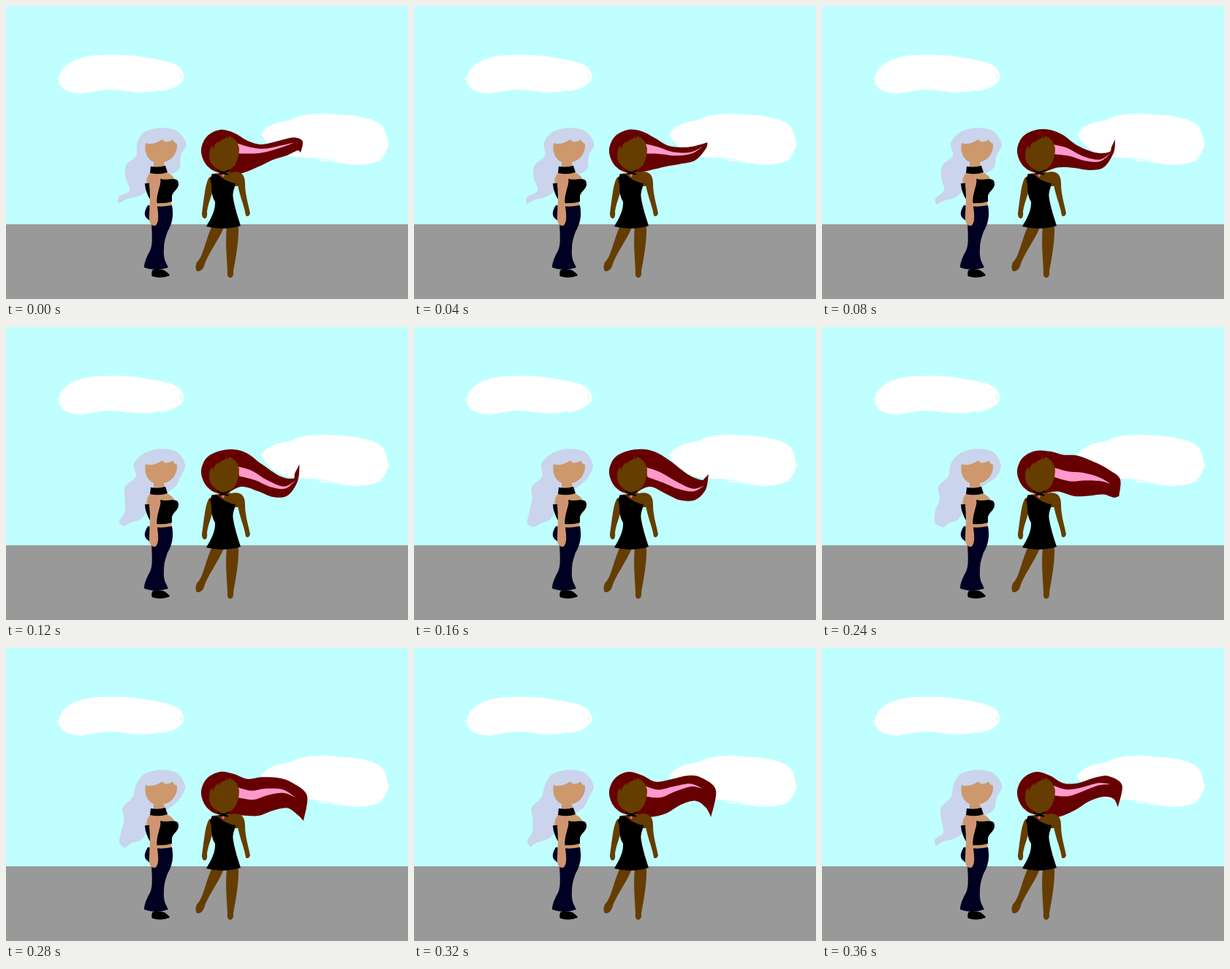
Recreate the animation shown at these times as an HTML page. Size 550 by 400 pixels, loop 400 ms.

```html
<!DOCTYPE html>
<html lang="en">
<head>
<meta charset="utf-8">
<title>Windy day</title>
<style>
  html, body { margin: 0; width: 100%; height: 100%; overflow: hidden; background: #bfffff; }
  svg { display: block; width: 550px; height: 400px; }
  .wisp { fill: none; stroke: #fff; stroke-width: 1.2; stroke-linecap: round; }
</style>
</head>
<body>
<svg viewBox="0 0 550 400">
  <rect width="550" height="400" fill="#bfffff"/>
  <rect y="298" width="550" height="102" fill="#999"/>

  <g fill="#fff">
    <path d="M72 99C74 82 94 68 130 67C160 65 185 69 207 73C230 77 243 83 243 96C243 107 225 114 207 116C180 121 160 114 140 114C118 116 108 121 90 118C78 115 72 108 72 99Z"/>
    <path d="M349 175C358 161 372 159 388 156C405 146 430 146 450 148C475 149 505 152 516 165C521 174 521 180 523 188C521 200 516 211 500 214C480 219 465 214 450 212C430 206 415 208 395 206C375 203 360 195 349 175Z"/>
  </g>
  <g class="wisp">
    <path d="M69 100L77 97M72 104Q80 115 96 118M76 108Q86 119 108 119M212 116Q238 111 243 99M218 113Q241 107 244 93M234 81Q241 86 241 94"/>
    <path d="M428 209Q446 213 458 214M430 211L442 212M456 214Q490 220 515 209M512 207Q519 201 520 193M514 191L525 187M517 196L524 190"/>
    <path stroke="#bfffff" d="M238 93L240 99"/>
  </g>

  <path id="silver" fill="#cad4ec"/>
  <g fill="#cc986c">
    <path d="M191 187C198 190 207 187 214 182C216 187 224 186 228 182C230 187 232 187 234 188C235 202 226 211 216 213L217 221H202V213C192 208 189 198 191 187Z"/>
    <path d="M198 227H220Q229 231 231 238L192 244Q192 232 198 227Z"/>
    <path d="M204 266H226L227 274H204Z"/>
  </g>
  <path fill="#000022" d="M194 272C188 282 188 288 197 293L199 297C200 315 201 328 196 336C191 345 189 352 189 357Q205 363 222 357C219 350 215 346 216 332C216 322 219 314 221 308C227 298 230 286 227 272Q212 275 204 273Z"/>
  <path d="M201 360Q210 358 217 361Q224 366 224 368Q212 373 200 369Q198 364 201 360Z"/>
  <path d="M190 242Q200 243 212 236C222 239 235 232 236 242C237 250 227 254 227 260V267Q214 271 197 268V264Q190 252 190 242Z"/>
  <path fill="#cf9573" d="M197 229C207 226 213 232 211 243C208 255 205 262 207 274C209 287 209 297 204 300C199 300 196 297 196 290C196 275 198 260 196 245Z"/>
  <path d="M198 219Q209 221 218 218L221 227Q210 231 197 228Z"/>

  <path id="red" fill="#660000"/>
  <path id="streak" fill="#ff99cc"/>
  <g fill="#663d00">
    <path d="M319 194C319 216 308 224 304 223L305 232H291V223C282 219 275 210 279 196L282 190L283 196Q286 187 291 184L290 188Q295 181 302 180L300 175L304 181L305 177Q317 182 319 194Z"/>
    <path d="M284 229L305 226L318 232V246H300Z"/>
    <path d="M279 233C273 238 271 262 268 283Q268 290 272 290Q276 289 275 281C277 265 285 255 283 240Z"/>
    <path d="M308 227C322 224 327 231 327 242C327 258 332 272 334 283Q332 289 328 286C326 272 319 258 317 243L313 242Z"/>
    <path d="M282 300H299C290 322 275 340 271 355Q268 363 261 362Q258 357 261 350C270 342 272 322 282 300Z"/>
    <path d="M302 300H318C319 320 314 345 311 362Q312 371 306 371Q302 370 303 362C302 340 300 325 302 300Z"/>
  </g>
  <path d="M282 229L290 230Q300 240 314 242C313 249 309 254 311 263C313 276 318 290 321 300Q298 307 274 301C279 292 287 280 286 267C279 257 283 245 279 236Z"/>
  <path d="M290 224Q298 230 305 224M292 229Q298 227 304 230" fill="none" stroke="#000" stroke-width="2"/>
  <circle cx="297" cy="231.5" r="1.7" fill="#ff6699"/>
</svg>
<script>
const STEP = 40, COUNT = 10;

// Each point swings around a rest place: [x, y, swing x, swing y, lag in steps, extra lag of x]
const redTop = [
  [312, 170.5, 0, 3.8, -1.2], [330, 177.5, 0, 7, -0.8], [350, 183.5, 0, 8, 1.3],
  [375, 189, 0, 14.7, 3.1], [393, 192, 0, 17, 3.8], [404, 197, 9, 12.5, 5.1, 2.7], [404, 209, 3, 27, 7]
];
const redLow = [
  [322, 224.5, 0, 6.8, -1.5], [345, 225, 0, 6, 5.7], [365, 223, 0, 14, 4.4],
  [385, 219.5, 0, 17, 4.4], [399, 214, 0, 19, 5.8]
];
const redHead = [[300, 229], [284, 225], [272, 214], [267, 196], [275, 178], [293, 169]];

const silverIn = [
  [210, 166], [233, 170], [245.5, 188, 1], [239, 204], [232.5, 217, 5, 5, 0.5], [220, 226, 6, 4, 0.5],
  [205, 235], [193, 252], [183, 262, 3, 2, 5], [170, 266, 4, 2.5, 5], [160, 272, 7, 2, 5.3]
];
const silverOut = [
  [155, 264.5, 0, 4.7, 5], [162, 252, 7.5, 0, 0.6], [162.5, 235, 1.5, 0, 0.5], [162, 218, 2.7, 0, 1.1],
  [176, 204, 3.3, 0, 1.4], [177, 187, 2.8, 0, -1], [189.5, 172], [210, 166]
];

const wave = turn => Math.cos(turn * 2 * Math.PI / COUNT);
const swing = (points, step) => points.map(([x, y, dx = 0, dy = 0, lag = 0, skew = 0]) =>
  [x + dx * wave(step - lag - skew), y + dy * wave(step - lag)]);
const between = (a, b, k) => a.map((v, i) => v + (b[i] - v) * k);

// Catmull-Rom spline through the points, as cubic segments
function spline(p) {
  let d = '';
  for (let i = 0; i < p.length - 1; i++) {
    const a = p[i - 1] || p[i], b = p[i], c = p[i + 1], e = p[i + 2] || c;
    const h1 = b.map((v, j) => v + (c[j] - a[j]) / 6);
    const h2 = c.map((v, j) => v - (e[j] - b[j]) / 6);
    d += `C${h1} ${h2} ${c}`;
  }
  return d;
}

// Two smooth edges that meet in a sharp tip
function outline(out, back) {
  const tip = out[out.length - 1];
  return `M${out[0]}${spline(out)}${spline([tip, ...back])}Z`;
}

// A tapering band that follows the middle of the red hair
function streakPath(top, low, step) {
  const centre = 0.48 + 0.13 * wave(step - 4);
  const last = low.length - 1;
  const edge = side => low.map((p, i) =>
    between(top[i], p, centre + side * 0.13 * (1 - (i / last) ** 2)));
  return outline(edge(-1), edge(1).reverse().slice(1));
}

const setPath = (id, d) => document.getElementById(id).setAttribute('d', d);

function draw(step) {
  const top = swing(redTop, step), low = swing(redLow, step);
  setPath('silver', outline(swing(silverIn, step), swing(silverOut, step)));
  setPath('red', outline([...redHead, ...top], [...low].reverse().concat([redHead[0]])));
  setPath('streak', streakPath(top, low, step));
}

const start = performance.now();
function tick(now) {
  draw(Math.floor(Math.max(0, now - start) / STEP) % COUNT);
  requestAnimationFrame(tick);
}
draw(0);
requestAnimationFrame(tick);
</script>
</body>
</html>
```
